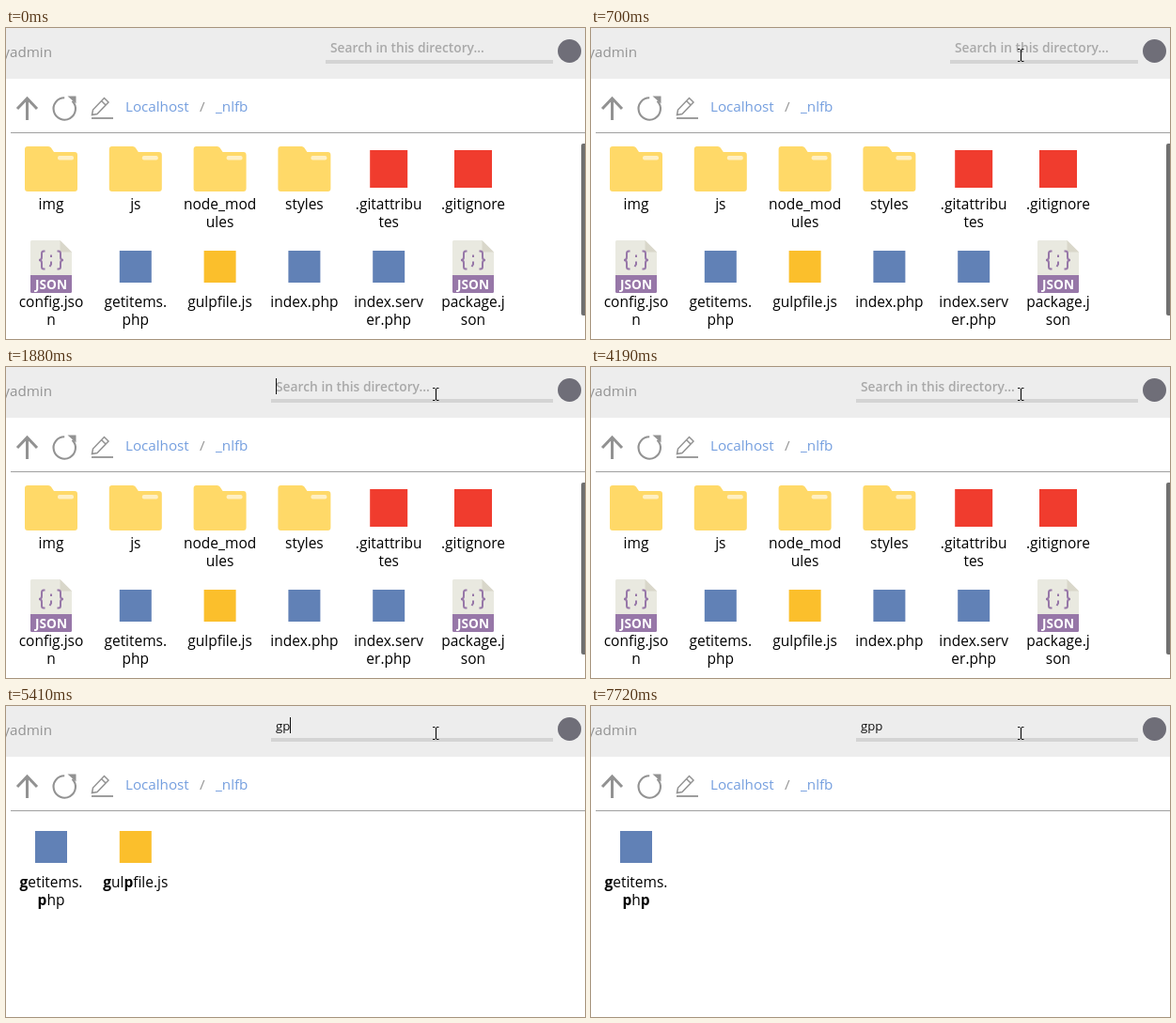
An HTML page that plays this animation: 616x331 px, repeating every 8.84 s.

```html
<!DOCTYPE html>
<html lang="en">
<head>
<meta charset="utf-8">
<title>File browser search</title>
<style>
  html, body { margin: 0; width: 100%; height: 100%; overflow: hidden; background: #fff; }
  svg { display: block; width: 616px; height: 331px; }
  text { font-family: "Open Sans", "Noto Sans", sans-serif; font-size: 15.2px; font-weight: 500; }
  .label { text-anchor: middle; font-size: 15.5px; fill: #000; }
  .bold { font-weight: 700; fill: #000; }
  .link { fill: #759fdf; }
  .muted { fill: #949494; }
  .tool { fill: none; stroke: #929292; stroke-width: 3; }
  #hint { font-size: 13.8px; font-weight: 600; fill: #a9a9a9; }
  #typed { font-size: 13.2px; fill: #111; }
  .ext { font-size: 13.6px; font-weight: 700; fill: #fff; text-anchor: middle; }
</style>
</head>
<body>
<svg viewBox="0 0 616 331">
  <rect width="616" height="331" fill="#fff"/>
  <rect width="616" height="54" fill="#ededed"/>
  <text class="muted" x="49" y="31" text-anchor="end">yadmin</text>
  <circle cx="599.5" cy="24.5" r="12.5" fill="#6f6e78"/>

  <rect id="line" y="34" height="4" fill="#d4d4d4"/>
  <text id="hint" y="26">Search in this directory...</text>
  <text id="typed" x="287" y="26"></text>
  <rect id="caret" y="12" width="1" height="17" fill="#111"/>

  <g class="tool">
    <path d="M22.5 98V75M12 86L22.5 75L33 86"/>
    <path d="M70.5 77.7A11.7 11.7 0 1 1 62.2 74.3" stroke-width="2.1"/>
    <path d="M65.5 72.5H74.5V80.5Z" fill="#929292" stroke="none"/>
    <path d="M91.5 92.5L92.5 87L104.5 74.5L109 79L97 91.5ZM101.5 77.5L106 82" stroke-width="1.5"/>
    <path d="M91 96H114" stroke-width="1.8"/>
  </g>
  <text class="link" x="127" y="89">Localhost</text>
  <text class="muted" x="206" y="89">/</text>
  <text class="link" x="223" y="89">_nlfb</text>
  <path d="M5 111.5H616" stroke="#a0a0a0"/>

  <g id="views"></g>
  <rect id="scroll" x="612" y="123" width="6" height="183" rx="2" fill="#707070"/>

  <path id="arrow" d="M0 0V16L3.7 12.5L6.2 18L8.7 17L6.2 11.5H11.3Z" fill="#fff" stroke="#111"/>
  <path id="beam" d="M454 22.5H456.5M458 22.5H460.5M457.5 23V35M454 35.5H456.5M458 35.5H460.5"
        fill="none" stroke="#111" stroke-width="1.2"/>
</svg>
<script>
const LOOP = 8840;
const $ = id => document.getElementById(id);

// Each icon sits in a 56 by 56 box centred on x = 0.
const square = (size, color) =>
  `<rect x="${-size / 2}" y="${28 - size / 2}" width="${size}" height="${size}" fill="${color}"/>`;

const icons = {
  folder: `<path d="M-28 7Q-28 4 -25 4H-3Q-1 4 0 5.5L3 10H25Q28 10 28 13V49Q28 52 25 52H-25Q-28 52 -28 49Z" fill="#ffd968"/>
    <rect x="7" y="14" width="17" height="4.5" rx="2" fill="#fff0c4"/>`,
  git: square(40, '#f03c2e'),
  php: square(34, '#6181b6'),
  js: square(34, '#fbbf2c'),
  json: `<path d="M-22 1.5Q-22 0 -20.5 0H9.5L22 12.5V40H-22Z" fill="#e9e9e0"/>
    <path d="M9.5 0V12.5H22Z" fill="#d9d7ca"/>
    <path d="M-22 37H22V54.5Q22 56 20.5 56H-20.5Q-22 56 -22 54.5Z" fill="#9777a8"/>
    <g fill="none" stroke="#9777a8" stroke-width="2">
      <path d="M-6.5 11.5H-8Q-10 11.5 -10 14V18Q-10 21 -13 21Q-10 21 -10 24V28Q-10 30.5 -8 30.5H-6.5"/>
      <path d="M6.5 11.5H8Q10 11.5 10 14V18Q10 21 13 21Q10 21 10 24V28Q10 30.5 8 30.5H6.5"/>
      <path d="M0 15.5V18M0 22.5V25.5L-1.5 28"/>
    </g>
    <text class="ext" x="0" y="52">JSON</text>`
};

// A bar marks a line break inside the label.
const files = [
  ['folder', 'img'], ['folder', 'js'], ['folder', 'node_mod|ules'], ['folder', 'styles'],
  ['git', '.gitattribu|tes'], ['git', '.gitignore'], ['json', 'config.jso|n'],
  ['php', 'getitems.|php'], ['js', 'gulpfile.js'], ['php', 'index.php'],
  ['php', 'index.serv|er.php'], ['json', 'package.j|son']
];

// Marks the letters of the query in order; null when they do not all occur.
function match(name, query) {
  let next = 0;
  const marked = [...name].map(c =>
    next < query.length && c === query[next] ? (next++, `<tspan class="bold">${c}</tspan>`) : c);
  return next === query.length ? marked : null;
}

function label(chars) {
  return chars.join('').split('|').map((line, i) =>
    `<text class="label" y="${71 + i * 18.6}">${line}</text>`).join('');
}

function view(query) {
  const cells = files.map(([icon, name]) => [icon, match(name, query)]).filter(f => f[1]);
  return `<g>${cells.map(([icon, chars], i) =>
    `<g transform="translate(${48 + (i % 6) * 89.8} ${122 + Math.floor(i / 6) * 104})">` +
    icons[icon] + label(chars) + '</g>').join('')}</g>`;
}

const queries = ['', 'g', 'gp', 'gpp'];
$('views').innerHTML = queries.map(view).join('');
const views = [...$('views').children];

// Hard steps: [start in ms, value]
const left = [[0, 340], [100, 381], [260, 382], [1770, 312], [1880, 282]];
const typing = [[0, 0], [5290, 1], [5410, 2], [5510, 3]];
const caret = [[0, null], [1770, 317], [1880, 287], [4190, null],
  [5290, 294], [5410, 302], [5510, 310], [7720, null]];
const pointer = [[0, null], [100, [538, 234]], [260, [530, 212]], [370, [510, 156]],
  [480, [482, 92]], [590, [464, 46]], [700, null]];

const at = (steps, t) => steps.filter(s => s[0] <= t).pop()[1];
const show = (el, on) => { el.style.display = on ? '' : 'none'; };

function draw(t) {
  const x = at(left, t), count = at(typing, t);
  const caretX = at(caret, t), tip = at(pointer, t);

  $('line').setAttribute('x', x);
  $('line').setAttribute('width', 582 - x);
  $('hint').setAttribute('x', x + 5);
  show($('hint'), count === 0);
  $('typed').textContent = queries[count];

  show($('caret'), caretX !== null);
  if (caretX !== null) $('caret').setAttribute('x', caretX);

  views.forEach((el, i) => show(el, i === count));
  show($('scroll'), count === 0);

  show($('arrow'), tip);
  if (tip) $('arrow').setAttribute('transform', `translate(${tip})`);
  show($('beam'), t >= 700);
}

const start = performance.now();
function tick() {
  draw((performance.now() - start) % LOOP);
  requestAnimationFrame(tick);
}
tick();
</script>
</body>
</html>
```
